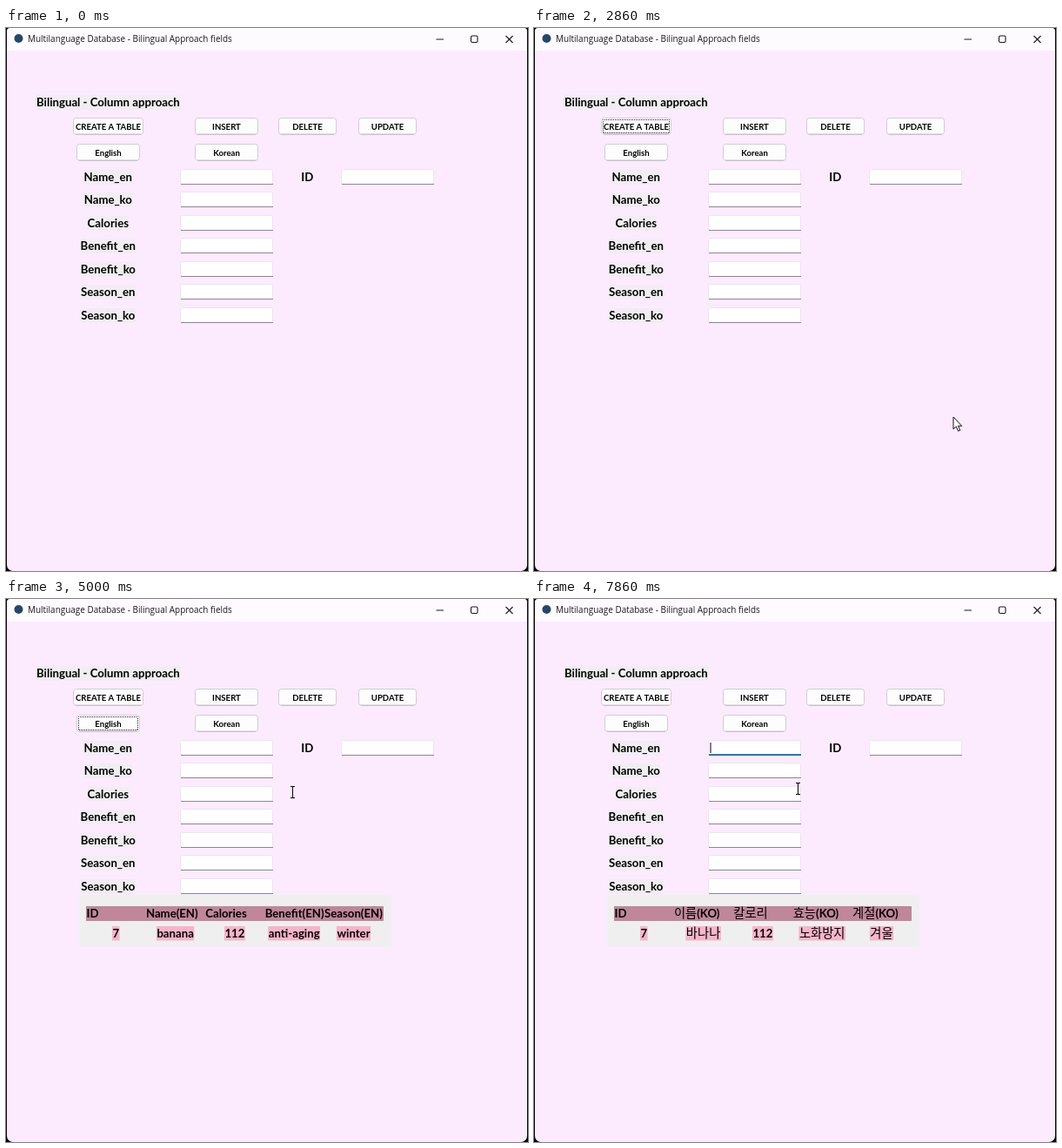
Animation of 600 by 624 pixels, one loop 8000 ms. Source, as an HTML page with a canvas:

```html
<!DOCTYPE html>
<html lang="en">
<head>
<meta charset="utf-8">
<title>Bilingual fields form</title>
<style>
  html, body { margin: 0; width: 100%; height: 100%; overflow: hidden; background: #000; }
  canvas { display: block; }
</style>
</head>
<body>
<canvas id="stage" width="600" height="624"></canvas>
<script>
const ctx = document.getElementById('stage').getContext('2d');
const LOOP = 8000, TICKS = 56;
const BOLD = 'bold 13.2px Lato, sans-serif';
const BOLD_SMALL = 'bold 9.6px Lato, sans-serif';
const HANGUL = '500 14.3px "Noto Sans CJK KR", "Noto Sans CJK", sans-serif';
const ui = size => `${size}px "Open Sans", sans-serif`;

// Pointer waypoints: tick, x, y
const PATH = [
  [1, 241, 368], [4, 185, 200], [5, 185, 200], [8, 174, 140], [13, 174, 140],
  [14, 446, 315], [17, 486, 425], [19, 486, 425], [21, 478, 469], [26, 176, 172],
  [32, 176, 172], [35, 329, 222], [39, 314, 170], [48, 314, 170],
  [49, 303, 211], [50, 303, 211], [51, 303, 218]
];

const TABLES = {
  en: {
    head: ['ID', 'Name(EN)', 'Calories', 'Benefit(EN):', 'Season(EN)'],
    row: ['7', 'banana', '112', 'anti-aging', 'winter']
  },
  ko: {
    head: ['ID', '이름(KO)', '칼로리', '효능(KO)', '계절(KO)'],
    row: ['7', '바나나', '112', '노화방지', '겨울']
  }
};

const within = (k, from, to) => k >= from && k <= to;

function rect(x, y, w, h, color) {
  ctx.fillStyle = color;
  ctx.fillRect(x, y, w, h);
}

function box(x, y, w, h, r, fill, stroke, width = 1) {
  ctx.beginPath();
  ctx.roundRect(x, y, w, h, r);
  if (fill) { ctx.fillStyle = fill; ctx.fill(); }
  if (stroke) { ctx.strokeStyle = stroke; ctx.lineWidth = width; ctx.stroke(); }
}

function dot(x, y, r, color) {
  ctx.beginPath();
  ctx.arc(x, y, r, 0, Math.PI * 2);
  ctx.fillStyle = color;
  ctx.fill();
}

function line(color, width, ...points) {
  ctx.beginPath();
  points.forEach(([x, y], i) => i ? ctx.lineTo(x, y) : ctx.moveTo(x, y));
  ctx.strokeStyle = color;
  ctx.lineWidth = width;
  ctx.stroke();
}

function text(str, x, y, font, color = '#000', align = 'left') {
  ctx.font = font;
  ctx.fillStyle = color;
  ctx.textAlign = align;
  ctx.fillText(str, x, y);
}

// Splits a string into Hangul and Latin runs with their widths
function runsOf(str) {
  return (str.match(/[가-힣]+|[^가-힣]+/g) || []).map(part => {
    const font = /[가-힣]/.test(part) ? HANGUL : BOLD;
    ctx.font = font;
    return { part, font, width: ctx.measureText(part).width };
  });
}

function mixedText(str, x, y) {
  for (const run of runsOf(str)) {
    text(run.part, x, y, run.font);
    x += run.width;
  }
}

function label(str, cx, cy, back) {
  const width = runsOf(str).reduce((sum, run) => sum + run.width, 0);
  if (back) rect(cx - width / 2 - 0.5, cy - 8, width + 1, 16.5, back);
  mixedText(str, cx - width / 2, cy + 4.7);
}

function closeMark(cx, cy, color) {
  line(color, 1.1, [cx - 4, cy - 4], [cx + 4, cy + 4]);
  line(color, 1.1, [cx + 4, cy - 4], [cx - 4, cy + 4]);
}

function button(str, x, y, w, { hot, pressed, focus } = {}) {
  const active = hot || pressed;
  const fill = pressed ? '#cce4f7' : hot ? '#e0eef9' : '#fdfdfd';
  const edge = active ? (focus ? '#2c6f9f' : '#2f80bd') : '#cfcdd0';
  box(x + 0.5, y + 0.5, w - 1, 18.7, 3, fill, edge, active && focus ? 1.3 : 1);
  if (!active) line('#bdbbbe', 1, [x + 3, y + 19.2], [x + w - 3, y + 19.2]);
  if (focus) {
    // The half-pixel offset keeps the dots on whole pixels
    ctx.setLineDash([1, 1]);
    ctx.lineDashOffset = 0.5;
    ctx.strokeStyle = '#222';
    ctx.lineWidth = 1;
    ctx.strokeRect(x + 2.5, y + 2.5, w - 5, 15);
    ctx.setLineDash([]);
  }
  text(str, x + w / 2, y + 13.6, BOLD_SMALL, '#000', 'center');
}

function entry(x, cy, focused) {
  const top = Math.floor(cy - 9);
  box(x + 0.5, top + 0.5, 106, 17, 2, '#fff', '#ebe5ec');
  if (focused) {
    rect(x + 1, top + 16.2, 106, 1.8, '#1266b3');
    rect(x + 2.5, top + 3, 1, 12, '#000');
  } else {
    rect(x + 1, top + 17, 106, 1, '#8b888c');
  }
}

function titleBar(active) {
  const ink = active ? '#1a1a1a' : '#999';
  rect(0, 0, 600, 26, '#fefbfe');
  dot(14.5, 12, 5, '#24476e');
  text('Multilanguage Database - Bilingual Approach fields', 25, 16.3, ui(9.95), ink);
  line(ink, 1.1, [494.5, 13], [503, 13]);
  box(534.5, 9, 7.5, 7.5, 1.5, null, ink, 1.1);
  closeMark(578.5, 13, ink);
}

function form(k) {
  rect(34, 77, 167, 17, '#f0eef0');
  text('Bilingual - Column approach', 35, 90.3, BOLD);

  button('CREATE A TABLE', 77, 103, 81, {
    hot: k === 7, pressed: within(k, 8, 10), focus: within(k, 8, 10) || within(k, 19, 27)
  });
  button('INSERT', 217, 103, 73);
  button('DELETE', 313, 103, 67);
  button('UPDATE', 405, 103, 67);
  button('English', 81, 133, 73, {
    hot: within(k, 4, 6) || within(k, 25, 32), pressed: k === 28, focus: within(k, 28, 41)
  });
  button('Korean', 217, 133, 73, {
    hot: within(k, 38, 48), pressed: k === 42, focus: within(k, 42, 51)
  });

  ['Name_en', 'Name_ko', 'Calories', 'Benefit_en', 'Benefit_ko', 'Season_en', 'Season_ko']
    .forEach((name, i) => {
      const cy = 171 + i * 26.5;
      label(name, 117.3, cy, '#f0eef0');
      entry(200, cy, i === 0 && k >= 52);
    });
  label('ID', 346.3, 171);
  entry(385, 171);
}

function table({ head, row }) {
  rect(84, 340, 359, 60, '#f0eff0');
  head.forEach((name, i) => {
    const x = 92 + i * 68.4;
    rect(x, 353, 434 - x, 17, '#bf8799');
    mixedText(name, x + 0.5, 366.2);
  });
  row.forEach((value, i) => label(value, 126.3 + i * 68.3, 384, '#f7b5ca'));
}

function heart(cx, cy, size, color) {
  ctx.save();
  ctx.translate(cx, cy);
  ctx.scale(size, size);
  ctx.beginPath();
  ctx.moveTo(0, 4.5);
  ctx.bezierCurveTo(-9, -1, -4, -7.5, 0, -3);
  ctx.bezierCurveTo(4, -7.5, 9, -1, 0, 4.5);
  ctx.fillStyle = '#fff';
  ctx.fill();
  ctx.strokeStyle = color;
  ctx.lineWidth = 1.9;
  ctx.stroke();
  ctx.restore();
}

function dialog(okHot) {
  rect(216, 262, 257, 131, '#000');
  box(218, 264, 254, 127, [2, 2, 5, 5], '#fff');
  rect(218, 264, 254, 25, '#fefbfe');
  box(218, 356, 254, 35, [0, 0, 5, 5], '#f0f0f0');
  dot(232, 275, 4.7, '#24476e');
  text('CREATE Operation', 242, 279.5, ui(9.9), '#111');
  heart(335, 276.5, 0.95, '#222');
  closeMark(457.3, 276, '#1a1a1a');

  const blue = ctx.createLinearGradient(240, 309, 258, 336);
  blue.addColorStop(0, '#1c97e4');
  blue.addColorStop(1, '#0872c6');
  dot(249.5, 322.5, 13.6, blue);
  dot(249.5, 316.3, 1.2, '#fff');
  rect(248.6, 319.5, 1.8, 9.5, '#fff');

  text('A few bilingual fields table is created', 271, 326.5, ui(9.63), '#000');
  heart(441, 323.5, 0.82, '#59665a');
  box(396, 366, 62, 17, 3, okHot ? '#e0eef9' : '#fdfdfd', '#2a80cb', 1.5);
  text('OK', 427, 378, ui(9.5), '#000', 'center');
}

function pointerAt(k) {
  const next = PATH.findIndex(([tick]) => tick >= k);
  if (next < 0) return PATH[PATH.length - 1].slice(1);
  const [t1, x1, y1] = PATH[next];
  if (next === 0) return [x1, y1];
  const [t0, x0, y0] = PATH[next - 1];
  const ease = (1 - Math.cos(Math.PI * (k - t0) / (t1 - t0))) / 2;
  return [x0 + (x1 - x0) * ease, y0 + (y1 - y0) * ease];
}

function arrow(x, y) {
  const shape = new Path2D('M0 0V14L3.3 11L5.7 16.2L7.8 15.2L5.5 10.3H9.7Z');
  ctx.save();
  ctx.translate(x, y);
  ctx.fillStyle = '#fff';
  ctx.fill(shape);
  ctx.strokeStyle = '#111';
  ctx.lineWidth = 1;
  ctx.stroke(shape);
  ctx.restore();
}

function textCursor(x, y) {
  line('#111', 1.1, [x + 0.5, y - 6.5], [x + 0.5, y + 6.5]);
  for (const end of [-6.5, 6.5]) line('#111', 1.1, [x - 2, y + end], [x + 3, y + end]);
}

function draw(time) {
  // Steps fall on times rounded to 10 ms, hence the 5 ms allowance
  const k = Math.floor((time % LOOP + 5) * TICKS / LOOP) % TICKS;
  const modal = within(k, 11, 18);

  rect(0, 0, 600, 624, '#000');
  ctx.save();
  ctx.beginPath();
  ctx.roundRect(1, 0, 598, 624, [4, 4, 7, 7]);
  ctx.clip();
  rect(0, 0, 600, 624, '#fcebfe');
  titleBar(!modal);
  form(k);
  if (k >= 30) table(k >= 43 ? TABLES.ko : TABLES.en);
  if (modal) dialog(k >= 17);
  ctx.restore();

  if (k > 0) {
    const [x, y] = pointerAt(k);
    const overEntry = within(k, 34, 37) || k >= 49;
    (overEntry ? textCursor : arrow)(x, y);
  }
}

let start = null;
function frame(now) {
  start ??= now;
  draw(now - start);
  requestAnimationFrame(frame);
}
draw(0);
requestAnimationFrame(frame);
</script>
</body>
</html>
```
